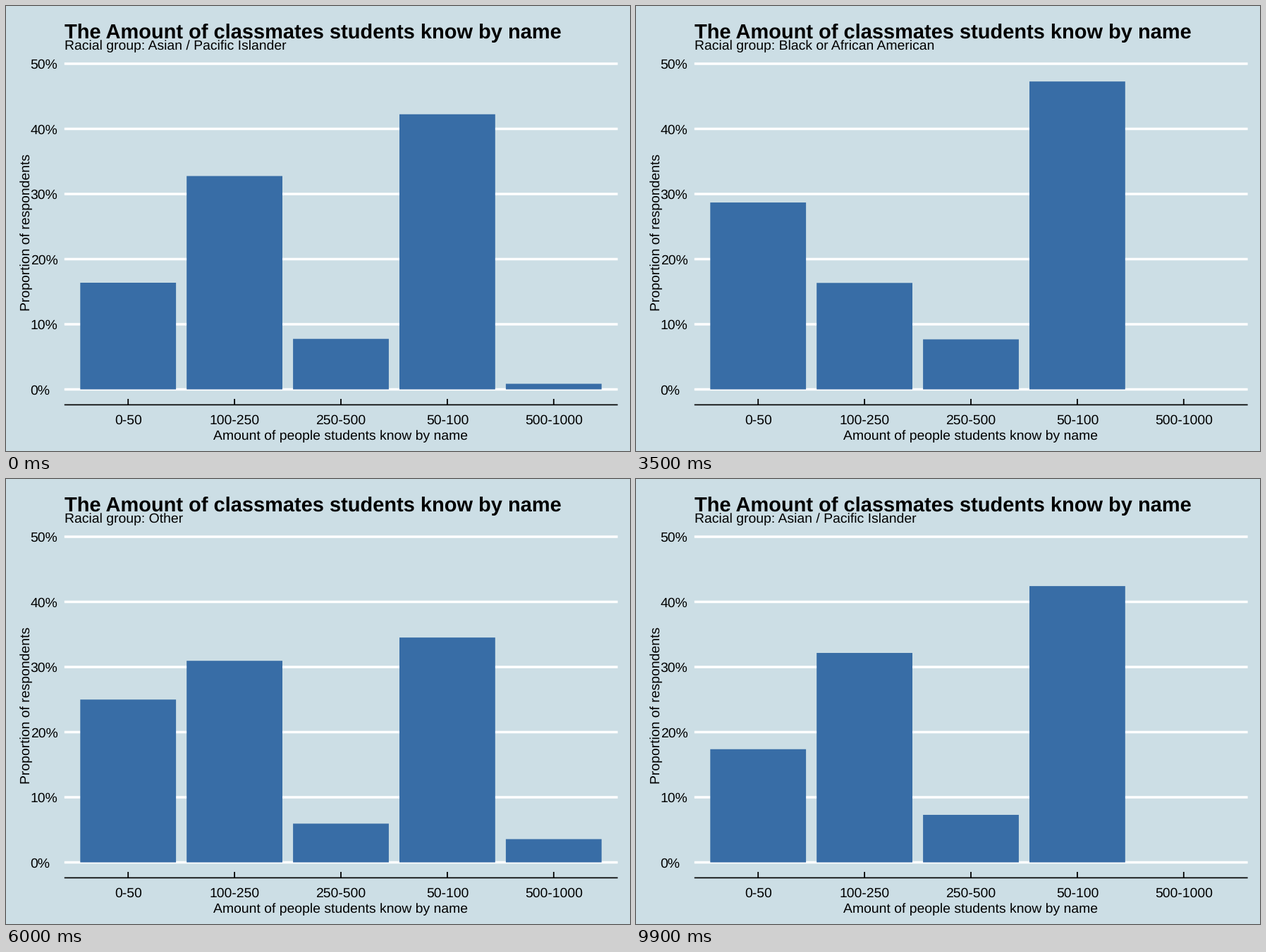
These frames come from a looping animation (885 px wide and 632 px high, 10 s). A matplotlib script:

```python
import matplotlib.pyplot as plt
from matplotlib.animation import FuncAnimation
from matplotlib.patches import Rectangle

W, H = 885, 632
BG, BLUE = "#ccdee5", "#386da6"
LEFT, RIGHT = 82.8, 867.6
ZERO_Y, PX_PER_PCT = 544.5, 9.25
AXIS_Y, TICK_TOP = 566.4, 558
FIRST_X, STEP_X = 173.2, 150.9
BAR_W = 0.9 * STEP_X
TEXT_PX = 19.33

STILL, MOVE = 13, 7          # frames held, then frames in motion
CYCLE = STILL + MOVE

LABELS = ["0-50", "100-250", "250-500", "50-100", "500-1000"]
# respondents per answer in each group
GROUPS = [
    ("Asian / Pacific Islander", [19, 38, 9, 49, 1]),
    ("Black or African American", [8, 6, 3, 15, 0]),
    ("Hispanic or Latino", [11, 3, 1, 14, 0]),
    ("Other", [21, 26, 5, 29, 3]),
    ("White", [36, 44, 7, 67, 0]),
]

plt.rcParams["font.family"] = ["Liberation Sans", "DejaVu Sans"]
plt.rcParams["text.hinting"] = "no_hinting"

# at 72 dpi one point is one pixel
fig = plt.figure(figsize=(W / 72, H / 72), dpi=72, facecolor=BG)
ax = fig.add_axes([0, 0, 1, 1])
ax.set_xlim(0, W)
ax.set_ylim(H, 0)
ax.axis("off")


def line(x0, y0, x1, y1, color, width):
    ax.plot([x0, x1], [y0, y1], color=color, lw=width, zorder=1,
            solid_capstyle="butt", snap=False)


def label(x, y, text, size=TEXT_PX, **style):
    return ax.text(x, y, text, fontsize=size, color="black",
                   va="baseline", zorder=3, **style)


def percents(counts):
    total = sum(counts)
    return [100 * n / total for n in counts]


def blend(start, end, t):
    """Bars move linearly; one that is missing at either end just pops."""
    if t <= 0:
        return start
    if t >= 1:
        return end
    return [a + (b - a) * t if a and b else 0 for a, b in zip(start, end)]


for pct in range(0, 51, 10):
    y = ZERO_Y - pct * PX_PER_PCT
    line(LEFT, y, RIGHT, y, "white", 3.5)
    label(34.6, y + 7, f"{pct}%")

line(LEFT, AXIS_Y, RIGHT, AXIS_Y, "black", 1.7)
bars = []
for i, name in enumerate(LABELS):
    x = FIRST_X + i * STEP_X
    line(x, TICK_TOP, x, AXIS_Y, "black", 1.8)
    label(x, 594, name, ha="center")
    bar = Rectangle((x - BAR_W / 2, ZERO_Y), BAR_W, 0, facecolor=BLUE,
                    linewidth=0, zorder=2, snap=False)
    bars.append(ax.add_patch(bar))

label(82.6, 46, "The Amount of classmates students know by name",
      size=1.5 * TEXT_PX, weight="bold")
subtitle = label(82.6, 62, "")
label(475, 616, "Amount of people students know by name", ha="center")
label(34, 321.5, "Proportion of respondents", ha="right", rotation=90,
      rotation_mode="anchor").set(ha="center")


def update(frame):
    state, step = divmod(frame, CYCLE)
    t = max(0, step - STILL) / MOVE
    name, counts = GROUPS[state]
    next_name, next_counts = GROUPS[(state + 1) % len(GROUPS)]
    subtitle.set_text("Racial group: " + (name if t < 0.5 else next_name))
    heights = blend(percents(counts), percents(next_counts), t)
    for bar, pct in zip(bars, heights):
        bar.set_height(-pct * PX_PER_PCT)
        bar.set_visible(pct > 0)
    return [subtitle, *bars]


anim = FuncAnimation(fig, update, frames=CYCLE * len(GROUPS), interval=100,
                     repeat=True, repeat_delay=0)
plt.show()
```
